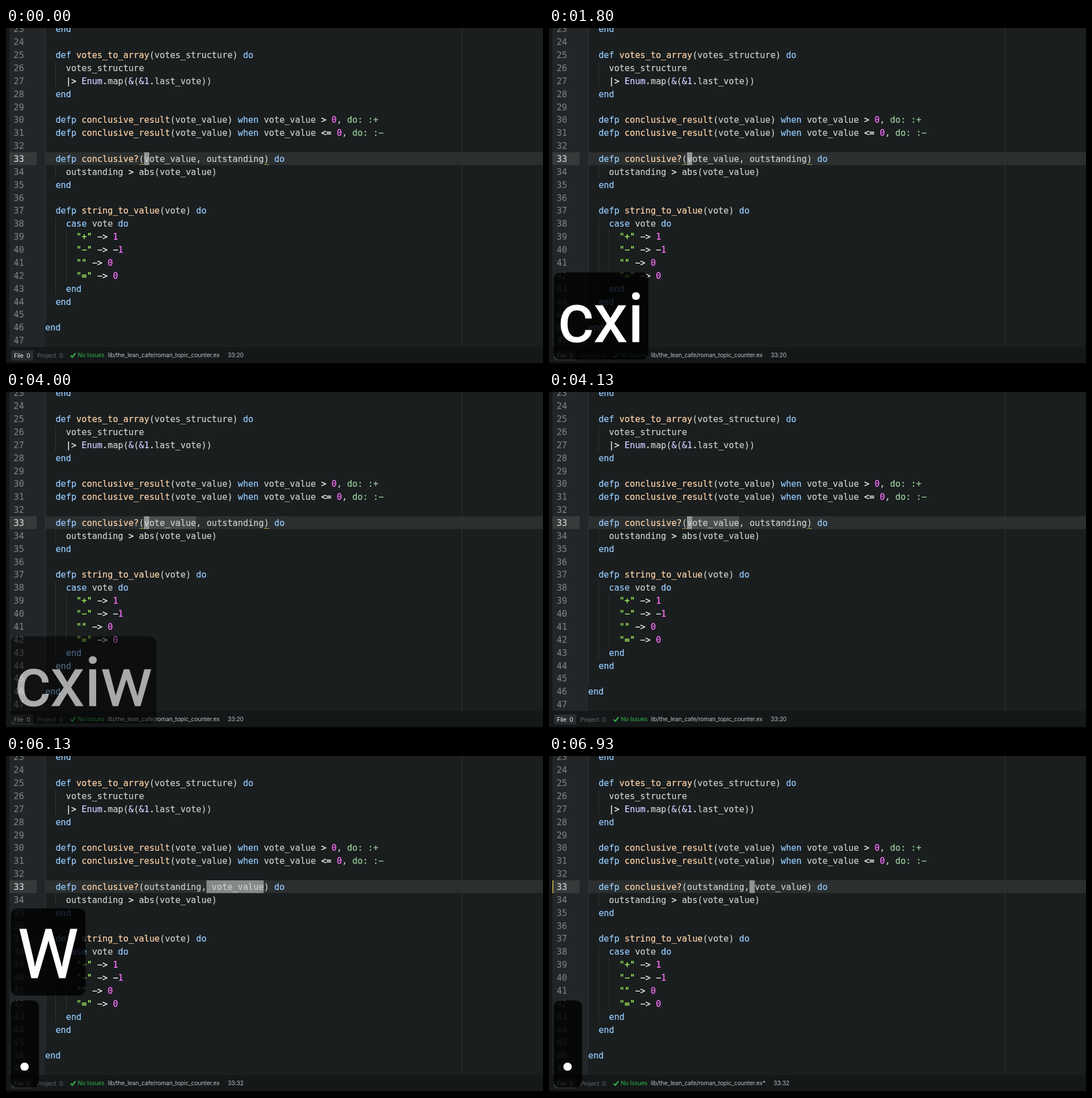
These frames come from a looping animation (947x592 px, 8000 ms). An HTML page:

```html
<!DOCTYPE html>
<html lang="en">
<head>
<meta charset="utf-8">
<title>Swapping arguments</title>
<style>
html, body { margin: 0; width: 100%; height: 100%; overflow: hidden; background: #1a1e1f; }
svg { display: block; }
text { white-space: pre; }
.code { font: 15.25px "DejaVu Sans Mono", monospace; color: #cbcecc; }
.code, .code tspan { fill: currentColor; stroke: currentColor; stroke-width: .22px; }
.key { color: #96cbfe; }
.fn { color: #ffd2a7; }
.str { color: #a8ff60; }
.num { color: #ff73fd; }
.atom { color: #99cc99; }
.cls { color: #cfcbff; }
.op { color: #f4f4f4; }
.no { color: #777b7e; }
.no.on { color: #d0d3d4; }
.bar { font: 10.4px Inter, "Liberation Sans", sans-serif; letter-spacing: -.14px; fill: #bcbfc1; }
.cap { font: 120.5px Roboto, Inter, sans-serif; fill: #fff; stroke: #fff; stroke-width: 1.2px; text-anchor: middle; }
</style>
</head>
<body>
<svg id="stage" width="947" height="592" viewBox="0 0 947 592"></svg>
<script>
const LOOP = 8000, LEFT = 69, CHAR = 9.18, ROW = 22.87, FIRST = 23;
const source = `  end

  def votes_to_array(votes_structure) do
    votes_structure
    |> Enum.map(&(&1.last_vote))
  end

  defp conclusive_result(vote_value) when vote_value > 0, do: :+
  defp conclusive_result(vote_value) when vote_value <= 0, do: :-

  defp conclusive?(vote_value, outstanding) do
    outstanding > abs(vote_value)
  end

  defp string_to_value(vote) do
    case vote do
      "+" -> 1
      "-" -> -1
      "" -> 0
      "=" -> 0
    end
  end

end
`.split("\n");

const kinds = ["str", "fn", "atom", "key", "cls", "num", "op"];
const tokens = /(".*?")|((?<=defp? )[\w?]+)|(\bdo:|:[+-])|(\b(?:defp?|do|end|when|case)\b)|(\bEnum\b|&1?)|(\b\d)|([|<>=.-]+)/g;
const escape = s => s.replace(/&/g, "&amp;").replace(/</g, "&lt;").replace(/-/g, "\u2212");
const paint = line => line.replace(tokens, (all, ...groups) =>
  `<tspan class="${kinds[groups.findIndex(g => g !== undefined)]}">${escape(all)}</tspan>`);

const rowY = n => 236 + (n - 33) * ROW;
const colX = c => LEFT + c * CHAR;
const rect = (x, y, w, h, fill, more = "") =>
  `<rect x="${x}" y="${y}" width="${w}" height="${h}" fill="${fill}" ${more}/>`;
const text = (x, y, cls, body, more = "") =>
  `<text x="${x}" y="${y}" class="${cls}" ${more}>${body}</text>`;
const guide = (col, from, to) =>
  rect(Math.round(colX(col)), rowY(from) - 17, 1, (to - from + 1) * ROW, "#323637");
const keyBox = (id, y) => `<g id="${id}" transform="translate(8.3 ${y})">
  <rect height="153.5" rx="12" fill="#000" fill-opacity=".82"/>${text(0, 122.5, "cap", "")}</g>`;

const rows = source.map((line, i) => {
  const n = FIRST + i, on = n === 33;
  return text(13.5, rowY(n), "code no" + (on ? " on" : ""), n) +
    text(LEFT, rowY(n), "code", paint(line), on ? 'id="swap"' : "");
}).join("");

const stage = document.getElementById("stage");
stage.innerHTML =
  rect(0, 0, 947, 592, "#1a1e1f") +
  rect(0, 0, 6, 562, "#151819") +
  rect(6, 0, 63, 562, "#222628") +
  rect(6, 219, 48, 22.5, "#363a3b") +
  rect(70, 219, 877, 22.5, "#2b2f30") +
  rect(804, 0, 1, 562, "#303435") +
  guide(0, 23, 45) + guide(2, 26, 27) + guide(2, 34, 34) + guide(2, 38, 43) + guide(4, 39, 42) +
  rect(6, 219, 1.5, 22.5, "#d5c04a", 'id="edited"') +
  ["mark", "select", "cursor"].map((id, i) =>
    rect(0, 219, CHAR, 22.5, ["#4a4d4d", "#878989", "#929494"][i], `id="${id}"`)).join("") +
  `<g id="pair">${rect(235, 240, 9, 1, "#b5a04a")}${rect(455, 240, 9, 1, "#b5a04a")}</g>` +
  rows +
  rect(0, 562, 947, 30, "#151819") + rect(0, 590, 947, 2, "#050606") +
  rect(9, 568, 39, 18, "#292d2f", 'rx="2"') +
  text(14, 580.5, "bar", "File  0", 'style="fill:#f0f0f0"') +
  text(55, 580.5, "bar", "Project  0", 'style="fill:#65696b"') +
  '<path d="M114 577l3 3 5.5-7" fill="none" stroke="#31b54a" stroke-width="2.2"/>' +
  text(126.5, 580, "bar", "No Issues", 'style="fill:#31b54a"') +
  text(179.5, 580, "bar", "", 'id="path"') +
  text(391, 580, "bar", "", 'id="place"') +
  keyBox("upper", 268.5) + keyBox("lower", 430.5);

const $ = id => document.getElementById(id);
const capWidth = { c: 82, cx: 141, cxi: 167, cxiw: 257, W: 132, ".": 50 };

// Each step changes only the listed parts; spans are [column, length].
const steps = [
  { at: 0, lower: "", lowerAlpha: 1, upper: "", upperAlpha: 1, cursor: [19, 1], mark: null,
    select: null, pair: true, swapped: false, edited: false, place: "33:20" },
  { at: 1470, lower: "c" },
  { at: 1530, lower: "cx" },
  { at: 1730, lower: "cxi" },
  { at: 1930, lower: "cxiw" },
  { at: 2000, select: [19, 10], cursor: null },
  { at: 2070, select: null, mark: [19, 10], cursor: [19, 1] },
  { at: 4000, lowerAlpha: .62 },
  { at: 4070, lowerAlpha: .27 },
  { at: 4130, lower: "", lowerAlpha: 1 },
  { at: 4730, lower: "W", cursor: [31, 1], pair: false, place: "33:32" },
  { at: 6130, lower: ".", upper: "W", mark: null, cursor: null, select: [31, 11], swapped: true },
  { at: 6200, select: null, cursor: [31, 1] },
  { at: 6400, edited: true },
  { at: 6730, upperAlpha: .85 },
  { at: 6800, upperAlpha: .55 },
  { at: 6870, upperAlpha: .25 },
  { at: 6930, upper: "" }
];

const show = (el, on) => el.setAttribute("visibility", on ? "visible" : "hidden");

function setSpan(id, span) {
  show($(id), span);
  if (!span) return;
  $(id).setAttribute("x", colX(span[0]));
  $(id).setAttribute("width", span[1] * CHAR);
}

function setKeys(id, keys, alpha) {
  const [box, label] = $(id).children, width = capWidth[keys] || 0;
  show($(id), keys);
  $(id).setAttribute("opacity", alpha);
  box.setAttribute("width", width);
  label.setAttribute("x", width / 2);
  label.textContent = keys;
}

let shown = -1;
function frame(now) {
  const t = Math.max(0, now - start) % LOOP;
  const count = steps.filter(s => s.at <= t).length;
  if (count !== shown) {
    shown = count;
    const s = Object.assign({}, ...steps.slice(0, count));
    for (const id of ["mark", "select", "cursor"]) setSpan(id, s[id]);
    setKeys("upper", s.upper, s.upperAlpha);
    setKeys("lower", s.lower, s.lowerAlpha);
    show($("pair"), s.pair);
    show($("edited"), s.edited);
    const args = s.swapped ? "outstanding, vote_value" : "vote_value, outstanding";
    $("swap").innerHTML = paint(`  defp conclusive?(${args}) do`);
    $("path").textContent = "lib/the_lean_cafe/roman_topic_counter.ex" + (s.edited ? "*" : "");
    $("place").textContent = s.place;
    $("place").setAttribute("x", s.edited ? 396 : 391);
  }
  requestAnimationFrame(frame);
}
const start = performance.now();
frame(start);
</script>
</body>
</html>
```
